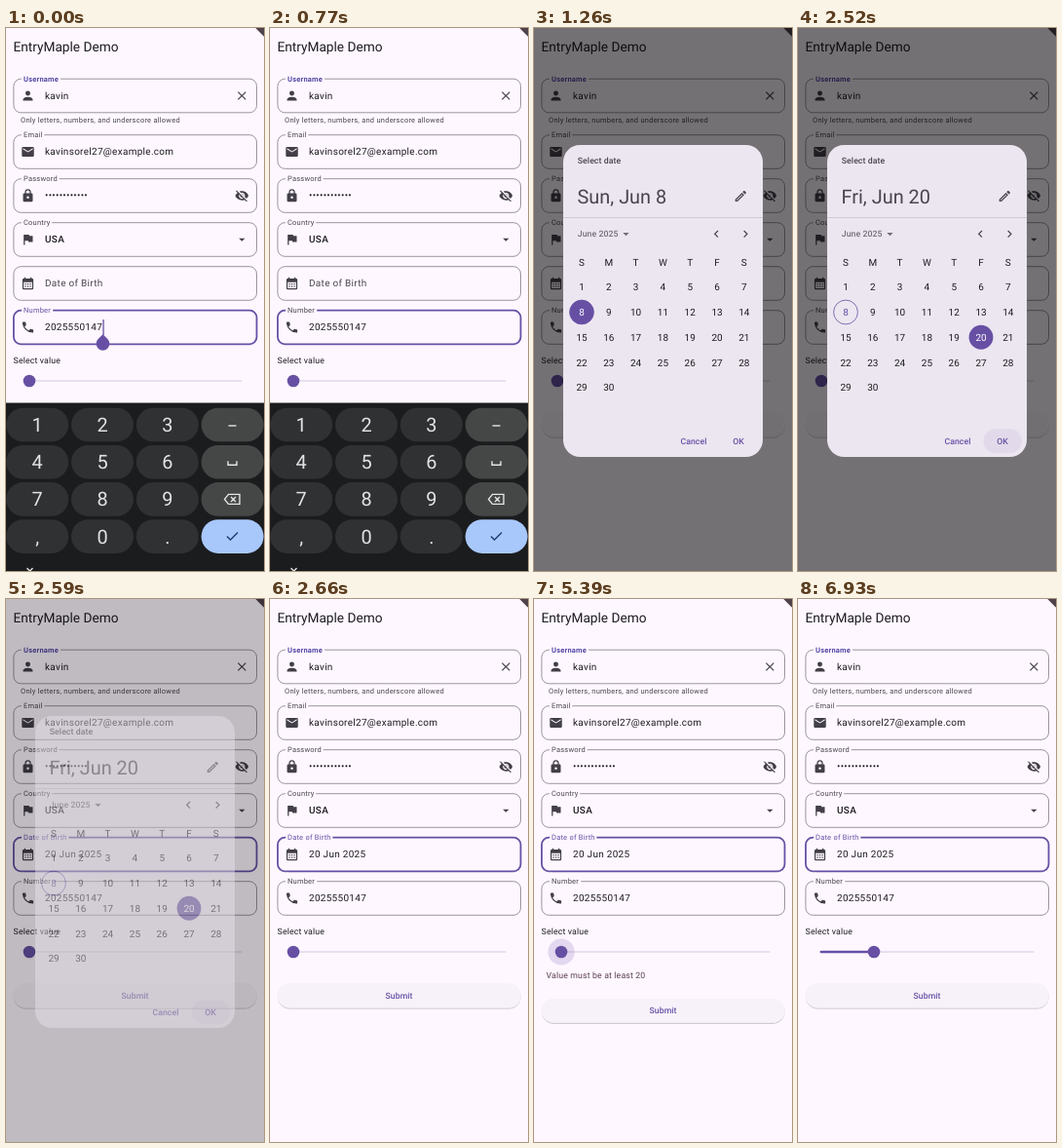
An HTML page that plays this animation: 265x557 px, repeating every 8000 ms.

```html
<!DOCTYPE html>
<html lang="en">
<head>
<meta charset="utf-8">
<title>Form demo</title>
<style>
  html, body { margin: 0; width: 100%; height: 100%; overflow: hidden; background: #fef7ff; }
  svg { display: block; width: 100vw; height: 100vh; }
  text { font-family: Roboto, "Open Sans", sans-serif; text-rendering: geometricPrecision; white-space: pre; }
</style>
</head>
<body>
<svg id="stage" viewBox="0 0 265 557" xmlns="http://www.w3.org/2000/svg"></svg>
<script>
const BG = '#fef7ff', INK = '#1d1b20', SOFT = '#49454f', LINE = '#79747e', PRIMARY = '#6750a4';
const DP = 0.6225, LOOP = 8000, STEP = 70;

// ---- drawing helpers ----
const text = (x, y, dp, str, o = {}) =>
  `<text x="${x}" y="${y}" font-size="${dp * DP}" fill="${o.fill || INK}" font-weight="${o.weight || 400}"
    letter-spacing="${(o.gap || 0) * DP}" text-anchor="${o.anchor || 'start'}" ${o.attr || ''}>${str}</text>`;
const mid = (x, y, dp, str, o = {}) => text(x, y + dp * DP * 0.355, dp, str, { anchor: 'middle', ...o });
const pill = (x, y, w, h, r, fill, attr = '') =>
  `<rect x="${x}" y="${y}" width="${w}" height="${h}" rx="${r}" fill="${fill}" ${attr}/>`;
const dot = (x, y, r, fill, attr = '') => `<circle cx="${x}" cy="${y}" r="${r}" fill="${fill}" ${attr}/>`;
const icon = (name, x, y, fill = '#433f48') =>
  `<path transform="translate(${x} ${y}) scale(${DP}) translate(-12 -12)" fill="${fill}" fill-rule="evenodd" d="${ICONS[name]}"/>`;

const ICONS = {};
ICONS.person = 'M12 12a4 4 0 1 0 0-8a4 4 0 0 0 0 8zm0 2c-2.7 0-8 1.3-8 4v2h16v-2c0-2.7-5.3-4-8-4z';
ICONS.mail = 'M4 4h16a2 2 0 0 1 2 2v12a2 2 0 0 1-2 2H4a2 2 0 0 1-2-2V6a2 2 0 0 1 2-2zm16 4V6l-8 5-8-5v2l8 5z';
ICONS.lock = 'M7 8V6a5 5 0 0 1 10 0v2h1a2 2 0 0 1 2 2v10a2 2 0 0 1-2 2H6a2 2 0 0 1-2-2V10a2 2 0 0 1 2-2zm2 0h6V6a3 3 0 0 0-6 0zm3 5a2 2 0 1 0 0 4a2 2 0 0 0 0-4z';
ICONS.flag = 'M14.4 6L14 4H5v17h2v-7h5.6l.4 2h7V6z';
ICONS.calendar = 'M5 4h1V2h2v2h8V2h2v2h1a2 2 0 0 1 2 2v14a2 2 0 0 1-2 2H5a2 2 0 0 1-2-2V6a2 2 0 0 1 2-2zm0 6v10h14V10z'
  + [7, 11, 15].map(x => `M${x} 12h2v2h-2zM${x} 16h2v2h-2z`).join('');
ICONS.phone = 'M6.6 10.8c1.4 2.8 3.8 5.1 6.6 6.6l2.2-2.2q.5-.4 1-.2 1.7.5 3.6.5 1 0 1 1V20q0 1-1 1A17 17 0 0 1 3 4q0-1 1-1h3.5q1 0 1 1 0 1.900.6 3.600.2.5-.3 1z';
ICONS.close = 'M19 6.4L17.6 5 12 10.6 6.4 5 5 6.4 10.6 12 5 17.6 6.4 19 12 13.4 17.6 19 19 17.6 13.4 12z';
ICONS.left = 'M15.4 7.4L14 6l-6 6 6 6 1.4-1.4-4.6-4.6z';
ICONS.right = 'M10 6L8.6 7.4l4.6 4.6-4.6 4.6L10 18l6-6z';
ICONS.down = 'M7 10l5 5 5-5z';
ICONS.edit = 'M14.1 9l.9.9L5.9 19H5v-.9zM17 3.3l-1.9 1.8 3.8 3.8 1.8-1.9q.7-.7 0-1.4l-2.3-2.3q-.7-.6-1.4 0zM14.1 6.2L3 17.25V21h3.75L17.8 9.9z';
ICONS.eyeOff = 'M12 7a5 5 0 0 1 4.64 6.83l2.92 2.92c1.51-1.26 2.7-2.89 3.43-4.75-1.73-4.39-6-7.5-11-7.5-1.4 0-2.74.25-3.98.7l2.16 2.16Q11 7 12 7z'
  + 'M2 4.27l2.74 2.74C3.08 8.3 1.78 10.02 1 12c1.73 4.39 6 7.5 11 7.5 1.55 0 3.03-.3 4.38-.84L19.73 22 21 20.73 3.27 3z'
  + 'M7.53 9.8l1.55 1.55A3 3 0 0 0 12.65 14.92l1.55 1.55A5 5 0 0 1 7.53 9.8zM11.84 9.02l3.15 3.15.02-.16a3 3 0 0 0-3-3z';

// ---- form ----
const box = (y, id = '') =>
  pill(7.9, y - 17.3, 249.6, 34.6, 7.4, 'none', `id="${id}" stroke="${LINE}" stroke-width=".75"`);
const label = (y, str, id = '', fill = SOFT, weight = 400) =>
  text(18, y - 14.9, 12, str, { fill, weight, gap: 0.375,
    attr: `id="${id}" stroke="${BG}" stroke-width="5" paint-order="stroke"` });
const value = (y, str, o = {}) => text(40, y + 3.4, 16, str, { gap: 0.5, ...o });

const form = () => `
  ${text(7.4, 24, 22, 'EntryMaple Demo')}
  ${box(69.5)}${label(69.5, 'Username', '', '#5346a4', 600)}${icon('person', 22.5, 69.5)}${value(69.5, 'kavin')}${icon('close', 242.3, 69.5)}
  ${text(15, 97, 12, 'Only letters, numbers, and underscore allowed', { fill: SOFT, gap: 0.4 })}
  ${box(127)}${label(127, 'Email')}${icon('mail', 22.5, 127)}${value(127, 'kavinsorel27@example.com')}
  ${box(172)}${label(172, 'Password')}${icon('lock', 22.5, 172)}${value(172, '•'.repeat(12))}${icon('eyeOff', 242.3, 172)}
  ${box(217)}${label(217, 'Country')}${icon('flag', 22.5, 217)}${value(217, 'USA', { weight: 500 })}${icon('down', 242.3, 217)}
  ${box(262, 'dobBox')}${icon('calendar', 22.5, 262)}
  <g id="dobEmpty">${value(262, 'Date of Birth', { fill: SOFT })}</g>
  <g id="dobFull">${label(262, 'Date of Birth', '', PRIMARY)}${value(262, '20 Jun 2025')}</g>
  ${box(307, 'numBox')}${label(307, 'Number', 'numLabel')}${icon('phone', 22.5, 307)}${value(307, '2025550147')}
  <rect id="caret" x="99.4" y="299" width="1.3" height="16" fill="${PRIMARY}"/>
  <path id="handle" fill="${PRIMARY}" d="M99.5 314.2l4.9 4.7a6.9 6.9 0 1 1-9.8 0z"/>
  ${text(7.6, 344, 14, 'Select value', { gap: 0.25 })}
  ${pill(22.5, 360.9, 220, 2.2, 1.1, '#e8e0f0')}
  <rect id="active" x="22.5" y="360.7" height="2.6" rx="1.3" fill="${PRIMARY}"/>
  ${dot(24, 362, 13.6, PRIMARY, 'id="halo"')}${dot(24, 362, 6.3, PRIMARY, 'id="thumb"')}
  <g id="error">${text(12.6, 389, 14, 'Value must be at least 20', { fill: '#583f4b', gap: 0.25 })}</g>
  <g id="submit">
    ${pill(7.7, 394.6, 250, 24.8, 12.4, '#f7f2fa', 'filter="url(#lift)"')}
    ${pill(7.7, 394.6, 250, 24.8, 12.4, PRIMARY, 'id="press"')}
    ${dot(158.5, 404.5, 9.5, PRIMARY, 'id="ripple"')}
    ${mid(132.5, 407, 14, 'Submit', { fill: PRIMARY, weight: 500, gap: 0.1 })}
  </g>
  <path d="M256.3 0H265V8.7z" fill="#4f4249"/>`;

// ---- date dialog, drawn with its top at 0 ----
const colX = c => 49 + 27.8 * c, rowY = r => 120 + 25.75 * r;
const dayNum = d => mid(colX((d - 1) % 7), rowY(1 + Math.floor((d - 1) / 7)), 16, d, { attr: `id="day${d}"` });
const days = Array.from({ length: 30 }, (_, i) => dayNum(i + 1)).join('');
const dialog = () => `
  ${pill(30, 0, 205, 320, 17.3, '#ece6f0')}
  ${text(44.8, 19, 14, 'Select date', { fill: SOFT, weight: 500, gap: 0.1 })}
  ${text(44.5, 59.5, 32, '', { fill: SOFT, attr: 'id="heading"' })}
  ${icon('edit', 212.3, 52.5, SOFT)}
  <path d="M30 74.5H235" stroke="#cac4d0" stroke-width=".8"/>
  ${text(44.8, 94.4, 14, 'June 2025', { fill: '#716d77', weight: 500, gap: 0.1 })}
  ${icon('down', 94.5, 91.3, '#716d77')}${icon('left', 187.3, 91.3, SOFT)}${icon('right', 217.3, 91.3, SOFT)}
  ${[...'SMTWTFS'].map((d, i) => mid(colX(i), rowY(0), 16, d)).join('')}
  ${dot(colX(0), rowY(2), 12.4, 'none', `id="today" stroke="${PRIMARY}" stroke-width=".8"`)}
  ${dot(colX(5), rowY(3), 12.4, PRIMARY, 'id="picked"')}
  ${days}
  ${mid(164, 303.8, 14, 'Cancel', { fill: PRIMARY, weight: 500, gap: 0.1 })}
  ${pill(190.5, 291.3, 39.5, 24.8, 12.4, PRIMARY, 'id="okPress"')}
  ${mid(210, 303.8, 14, 'OK', { fill: PRIMARY, weight: 500, gap: 0.1 })}`;

// ---- keyboard ----
const keyX = c => 32.2 + 66.8 * c, keyY = r => 407 + 38.2 * r;
const key = (ch, i) => {
  const c = i % 4, x = keyX(c), y = keyY(Math.floor(i / 4));
  const fill = i === 15 ? '#a8c7fa' : c === 3 ? '#454746' : '#303133';
  return pill(x - 32, y - 17.3, 64, 34.6, 17.3, fill) +
    (ch === ' ' ? '' : mid(x, y, 32, ch, { fill: '#e3e3e3' }));
};
const glyph = (x, y, d, color = '#e3e3e3') =>
  `<path transform="translate(${x} ${y})" fill="none" stroke="${color}" stroke-width="1.4" d="${d}"/>`;
const keyboard = () => `
  ${pill(0, 384.5, 265, 173, 0, '#1b1c1e')}
  ${[...'123 456 789 ,0. '].map(key).join('')}
  ${glyph(232.5, keyY(0), 'M-4 1H4')}
  ${glyph(232.5, keyY(1), 'M-4.5-1V3H4.5V-1')}
  ${glyph(232.5, keyY(2), 'M-8 0L-4-5H7.5V5H-4zM-1.5-2.5L3.5 2.5M3.5-2.5L-1.5 2.5')}
  ${glyph(232.5, keyY(3), 'M-5.5 0L-2 3.5L5.5-4', '#1f3b70')}
  ${glyph(24.5, 555.5, 'M-3-1.5L0 1.5L3-1.5')}`;

document.getElementById('stage').innerHTML = `
  <defs><filter id="lift" x="-5%" y="-20%" width="110%" height="150%">
    <feDropShadow dx="0" dy=".8" stdDeviation=".7" flood-opacity=".3"/></filter></defs>
  <rect width="265" height="557" fill="${BG}"/>
  ${form()}
  <rect id="barrier" width="265" height="557"/>
  <g id="dialog">${dialog()}</g>
  <g id="keys">${keyboard()}</g>`;

// ---- motion ----
const $ = id => document.getElementById(id);
const set = (id, attrs) => { for (const k in attrs) $(id).setAttribute(k, attrs[k]); };
const show = (id, o) => set(id, { opacity: +o });
const move = (id, y) => set(id, { transform: `translate(0 ${y})` });
const within = (t, a, b) => t >= a && t < b;
// rows of [time, value]
const track = (t, rows) => {
  let i = rows.length - 1;
  while (i > 0 && t < rows[i][0]) i--;
  const [a, va] = rows[i], [b, vb] = rows[i + 1] || rows[i];
  return b > a && t > a ? va + (vb - va) * (t - a) / (b - a) : va;
};
const outline = (id, focused) =>
  set(id, { stroke: focused ? PRIMARY : LINE, 'stroke-width': focused ? 1.8 : 0.75 });

const KEYS = [[840, 0], [910, 62], [980, 149.5], [1050, 175]];
const TOP = [[910, 32], [980, 46], [1050, 86], [1120, 107], [1190, 117], [1260, 120]];
const FADE = [[840, 0], [910, 0.45], [980, 1], [2520, 1], [2590, 0.45], [2660, 0]];
const PRESS = [[3710, 0], [3780, 0.1], [4060, 0.1], [4130, 0.05], [4200, 0]];
const HALO = [[5320, 0], [5390, 0.18], [6510, 0.18], [6580, 0.09], [6650, 0]];
const CARET = [[0, 1], [70, 0], [490, 0], [560, 0.5], [630, 1]];

function draw(time) {
  const t = Math.floor((time + 0.01) / STEP) * STEP;

  const typing = t < 770, filled = t >= 2590;
  show('caret', typing && track(t, CARET));
  show('handle', typing);
  set('numLabel', { fill: typing ? PRIMARY : SOFT });
  outline('numBox', t < 910);
  outline('dobBox', filled);
  show('dobEmpty', !filled);
  show('dobFull', filled);

  const fade = track(t, FADE), chosen = t >= 1960;
  show('barrier', fade * 0.54);
  show('dialog', fade);
  move('dialog', track(t, TOP));
  move('keys', track(t, KEYS));
  $('heading').textContent = chosen ? 'Fri, Jun 20' : 'Sun, Jun 8';
  set('today', { fill: chosen ? 'none' : PRIMARY });
  set('day8', { fill: chosen ? PRIMARY : '#fff' });
  set('day20', { fill: chosen ? '#fff' : INK });
  show('picked', chosen ? 1 : t >= 1890 ? 0.12 : 0);
  show('okPress', t >= 2520 ? 0.08 : 0);

  const x = t < 5390 ? 24 : track(t, [[5390, 28], [6650, 78]]);
  set('thumb', { cx: x });
  set('halo', { cx: x });
  set('active', { width: x - 22.5 });
  show('halo', track(t, HALO));

  // invalid until the slider passes its minimum
  const bad = t >= 3780 && x < 68;
  show('error', bad);
  move('submit', bad ? 15.3 : 0);
  show('press', track(t, PRESS));
  show('ripple', within(t, 3640, 3780) ? 0.1 : 0);
}

const start = performance.now();
function tick() {
  draw((performance.now() - start) % LOOP);
  requestAnimationFrame(tick);
}
draw(0);
requestAnimationFrame(tick);
</script>
</body>
</html>
```
